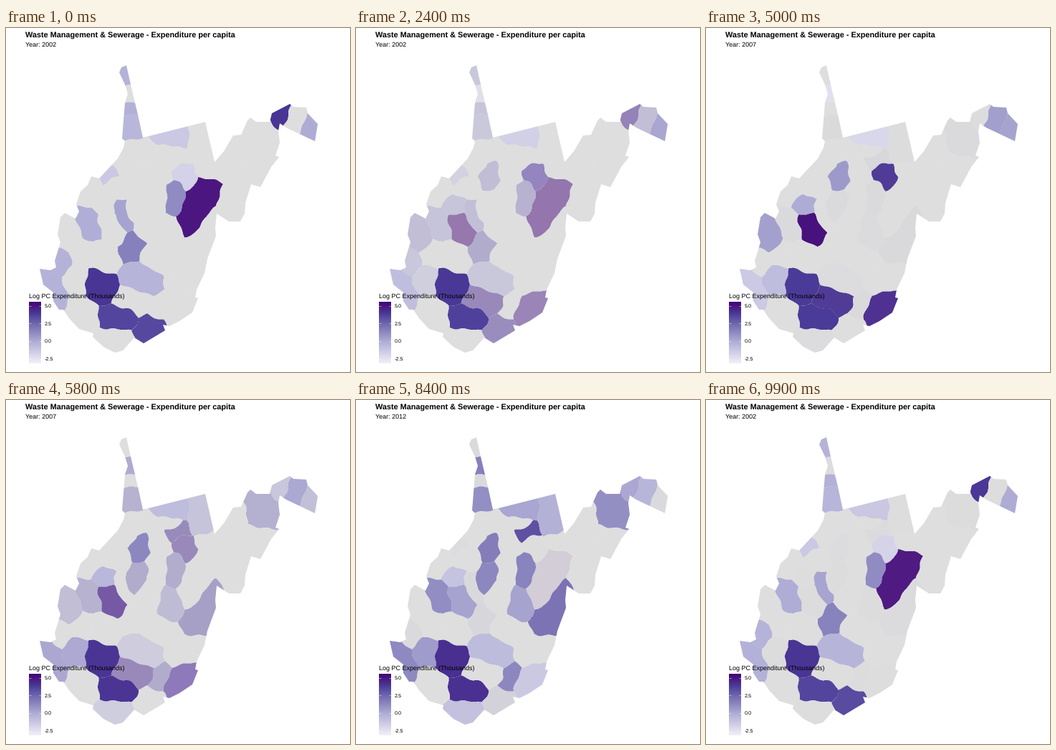
Recreate the animation shown at these times as a matplotlib script. Size 480 by 480 pixels, loop 10 s.

```python
import numpy as np
import matplotlib.pyplot as plt
from matplotlib.animation import FuncAnimation
from matplotlib.patches import Polygon

plt.rcParams["font.family"] = "Liberation Sans"
plt.rcParams["text.hinting"] = "none"

SIZE, DPI, FRAMES, INTERVAL = 480, 72, 100, 100
YEARS = (2002, 2007, 2012)
GREY, BORDER = np.array([222, 222, 222]), 229 / 255

# Fill scale: value -> colour
STOPS = [-3.1, 0, 2.5, 4.0, 5.0, 5.6]
SHADES = np.array([(241, 239, 247), (174, 172, 213), (112, 104, 175),
                   (73, 57, 151), (76, 22, 128), (63, 3, 120)])

RGB_XYZ = np.array([[.4124, .3576, .1805], [.2126, .7152, .0722], [.0193, .1192, .9505]])
WHITE = RGB_XYZ.sum(axis=1)
LAB = np.array([[0, 116, 0], [500, -500, 0], [0, 200, -200]])


def shade(value):
    if value is None:
        return GREY
    return np.array([np.interp(value, STOPS, SHADES[:, c]) for c in range(3)])


def to_lab(rgb):
    c = np.asarray(rgb) / 255
    lin = np.where(c > .04045, ((c + .055) / 1.055) ** 2.4, c / 12.92)
    return np.cbrt(lin @ RGB_XYZ.T / WHITE) @ LAB.T


def from_lab(lab):
    xyz = (lab @ np.linalg.inv(LAB).T) ** 3 * WHITE
    lin = np.clip(xyz @ np.linalg.inv(RGB_XYZ).T, 0, 1)
    return np.clip(np.where(lin > .0031308, 1.055 * lin ** (1 / 2.4) - .055, 12.92 * lin), 0, 1)


# Twice-fine grid, gently warped so that county borders look ragged
fine = (np.arange(2 * SIZE) + .5) / 2
gx, gy = np.meshgrid(fine, fine)
gx, gy = gx + np.sin(gy / 3.5), gy + np.sin(gx / 3.8)
nearest = np.full(gx.shape, np.inf)
owner = np.zeros(gx.shape, int)
levels = []


def county(start, end, radius, *values):
    """Claim every point that lies closer to this spine, less its radius, than to any other."""
    (x, y), (dx, dy) = start, np.subtract(end, start)
    along = np.clip(((gx - x) * dx + (gy - y) * dy) / (dx * dx + dy * dy), 0, 1)
    gap = np.hypot(gx - x - along * dx, gy - y - along * dy) - radius
    closer = gap < nearest
    nearest[closer] = gap[closer]
    owner[closer] = len(levels)
    levels.append(values or (N, N, N))


N = None

# Northern panhandle
county((163, 66), (171, 66), 14, -.3, N, N)
county((165, 92), (178, 92), 12, N, -2.6, 1.9)
county((165, 113), (183, 113), 8.5, -.2, N, N)
county((165, 140), (186, 137), 17, -.5, N, 1.2)

# Eastern panhandle
county((383, 116), (381, 126), 11, 4.1, N, -.3)
county((406, 121), (401, 136), 11, N, .5, -.3)
county((428, 131), (423, 148), 10, 0, .4, N)
county((355, 148), (358, 157), 21, N, N, 1.3)
county((322, 156), (320, 164), 14)
county((346, 198), (354, 198), 20)
county((316, 186), (316, 196), 15)
county((318, 240), (318, 250), 20)

# North
county((170, 174), (195, 171), 17)
county((212, 147), (243, 152), 13, -1.3, -2.1, .3)
county((272, 152), (274, 170), 17, N, N, -.1)
county((212, 172), (236, 172), 7)
county((230, 190), (247, 180), 8, N, N, 3.6)
county((208, 192), (218, 205), 14)
county((245, 202), (254, 212), 13, -1.8, 4.1, N)
county((278, 199), (296, 198), 12)
county((277, 229), (257, 268), 20, 5, N, N)
county((236, 225), (237, 250), 12, 1.2, N, 1.5)
county((191, 194), (184, 213), 11, N, .6, 2)
county((187, 241), (177, 258), 12, N, N, 1.6)
county((138, 211), (151, 201), 8, -1.3, N, N)
county((163, 190), (168, 186), 15)
county((150, 222), (158, 222), 15)
county((212, 228), (210, 245), 13)
county((200, 270), (195, 282), 16)

# West
county((112, 236), (122, 222), 14)
county((134, 246), (141, 248), 13, N, 0, -1)
county((158, 250), (168, 274), 9, .3, N, N)
county((180, 298), (171, 312), 13, 1.6, N, N)
county((142, 273), (151, 286), 15, N, 5.4, .5)
county((110, 262), (122, 283), 13, -.1, N, 1.2)
county((84, 274), (90, 297), 14, N, .5, N)
county((80, 323), (76, 333), 12, -.3, N, N)
county((55, 345), (76, 380), 13, -.3, -1.5, 1.4)
county((97, 348), (97, 357), 16, N, -.9, .8)
county((103, 318), (112, 312), 14)
county((132, 315), (142, 322), 17)

# South
county((126, 357), (140, 364), 17, 4.1, 3.9, 4.3)
county((145, 405), (166, 405), 15, 3.6, 3.9, 4.3)
county((165, 376), (192, 385), 15, N, 4.1, N)
county((178, 346), (198, 355), 17, -.4, N, -.8)
county((202, 414), (196, 424), 15, 3.5, N, N)
county((140, 436), (160, 436), 16, N, N, -.9)
county((216, 384), (209, 397), 11, N, N, 1.6)
county((254, 386), (238, 398), 16, N, 4.4, -1.3)
county((290, 268), (262, 313), 15, N, N, 2.4)
county((231, 277), (230, 290), 15, N, N, .5)
county((205, 318), (228, 328), 15)
county((262, 345), (240, 350), 16)
county((98, 388), (113, 408), 16)

# State border, clockwise
north_east = [(161, 55), (168, 52), (174, 79), (184, 121), (191, 153), (278, 131), (291, 187),
              (304, 172), (317, 150), (328, 149), (337, 129), (341, 125), (349, 131), (368, 131),
              (371, 119), (396, 106), (401, 110), (419, 111), (421, 119), (435, 134), (431, 158),
              (391, 139), (382, 133), (380, 144), (382, 160), (376, 178), (381, 180), (370, 194),
              (355, 222), (342, 218), (334, 244), (333, 259), (327, 270), (311, 270), (294, 259)]
south = [(292, 279), (293, 290), (281, 322), (277, 342), (266, 365), (264, 376), (268, 377),
         (260, 397), (242, 409), (228, 416), (219, 414), (222, 422), (192, 440), (179, 432),
         (163, 450), (152, 453), (136, 445), (121, 431), (122, 426), (102, 420), (88, 405),
         (80, 393), (74, 393)]
west = [(66, 381), (66, 369), (52, 358), (47, 336), (62, 338), (70, 334), (68, 325), (76, 299),
        (72, 288), (76, 264), (82, 258), (97, 266), (102, 256), (98, 246), (104, 228),
        (114, 219), (119, 207), (130, 210), (156, 182), (164, 167), (166, 158), (162, 154),
        (166, 104), (170, 92), (166, 79), (158, 62)]

# The four fine cells of each pixel, and how much of it is border
cells = [owner[i::2, j::2] for i in (0, 1) for j in (0, 1)]
seam = .5 * np.mean([cell != cells[0] for cell in cells], axis=0)[..., None]

keys = [to_lab([shade(values[i]) for values in levels]) for i in range(len(YEARS))]

fig = plt.figure(figsize=(SIZE / DPI, SIZE / DPI), dpi=DPI, facecolor="white")
ax = fig.add_axes([0, 0, 1, 1])

state = Polygon(north_east + south + west, facecolor="none", edgecolor="none")
ax.add_patch(state)
land = ax.imshow(np.ones((SIZE, SIZE, 3)), extent=(0, SIZE, SIZE, 0),
                 aspect="auto", interpolation="nearest")
land.set_clip_path(state)

# Legend
LEFT, RIGHT, TOP, BOTTOM = 32, 49, 382, 468
ramp = np.array([[shade(v)] for v in np.linspace(STOPS[-1], STOPS[0], BOTTOM - TOP)]) / 255
ax.imshow(ramp, extent=(LEFT, RIGHT, BOTTOM, TOP), aspect="auto", zorder=3)
for level in (5.0, 2.5, 0.0, -2.5):
    y = 437 - level * 9.87
    for x in (LEFT, RIGHT - 3.4):
        ax.plot([x, x + 3.4], [y, y], color="white", lw=.5, zorder=4, solid_capstyle="butt")
    ax.text(54, y + 2.2, f"{level:.1f}", size=7.3, zorder=4)
ax.text(32, 377, "Log PC Expenditure (Thousands)", size=9, zorder=4)

ax.text(27, 13.3, "Waste Management & Sewerage - Expenditure per capita", size=10.86, weight="bold")
year_text = ax.text(27, 26, "", size=9)

ax.set(xlim=(0, SIZE), ylim=(SIZE, 0))
ax.axis("off")


def update(frame):
    # Each year rests for half of its third, then blends into the next
    year, percent = divmod(3 * frame, 100)
    following = (year + 1) % 3
    blend = np.clip((percent - 48) / 50, 0, 1)
    fills = from_lab(keys[year] + (keys[following] - keys[year]) * blend)
    picture = sum(fills[cell] for cell in cells) / len(cells)
    land.set_data(picture * (1 - seam) + BORDER * seam)
    year_text.set_text(f"Year: {YEARS[following if percent > 75 else year]}")
    return land, year_text


anim = FuncAnimation(fig, update, frames=FRAMES, interval=INTERVAL, repeat=True, repeat_delay=0)
plt.show()
```
